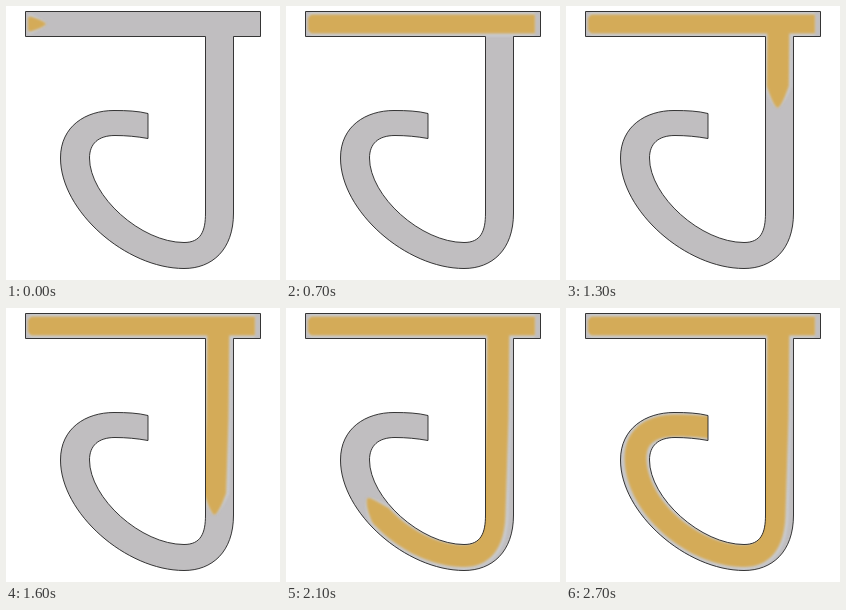
Recreate the animation shown at these times as an HTML page. Size 274 by 274 pixels, loop 2800 ms.

```html
<!DOCTYPE html>
<html>
<head>
<meta charset="utf-8">
<style>
html, body { margin: 0; width: 100%; height: 100%; overflow: hidden; background: #fff; }
svg { display: block; width: 274px; height: 274px; }
</style>
</head>
<body>
<svg viewBox="0 0 274 274">
  <defs>
    <path id="letter" d="M19.5 5.5H254.5V30.5H227.5V207C227.5 244 206 262.5 178 262.5C120 262.5 54.5 205 54.5 152C54.5 120 80 104.500 108 104.500C121 104.500 132 105 142 107.500V132.500C131 130.500 120 129.500 109 129.500C92 129.500 83.500 138 83.500 152C83.500 190 135 236.500 178 236.500C195 236.500 199.500 225 199.500 207V30.5H19.500Z"/>
    <clipPath id="inside"><use href="#letter"/></clipPath>
    <filter id="soft" filterUnits="userSpaceOnUse" x="0" y="0" width="274" height="274" color-interpolation-filters="sRGB">
      <feGaussianBlur stdDeviation="1.3"/>
    </filter>
  </defs>
  <use href="#letter" fill="#c0bec0"/>
  <g clip-path="url(#inside)">
    <g id="halo" fill="#c9cbd0" filter="url(#soft)"></g>
    <g id="paint" fill="#d4ab58" filter="url(#soft)"></g>
  </g>
  <use href="#letter" fill="none" stroke="#222" stroke-width="0.9"/>
</svg>
<script>
const LOOP = 2800, STEP = 100, TIP = 22;

function svgPath(d, parent) {
  const el = document.createElementNS('http://www.w3.org/2000/svg', 'path');
  if (d) el.setAttribute('d', d);
  if (parent) parent.append(el);
  return el;
}

// Each brush stroke: centre line, start time, pixels per step, half width
const strokes = [
  { d: 'M22 18H249', start: 0, speed: 33, half: 9.5 },
  { d: 'M212.5 14L211.5 110L208.5 205C208 235 197 248 178 248C128 248 70 200 69.500 150C69.500 126 88 117.500 110 117.500C122 117.500 132 118 144 119.500L154 121',
    start: 1100, speed: 35, half: 11 }
].map(s => {
  const line = svgPath(s.d);
  const length = line.getTotalLength();
  const points = [];
  for (let i = 0; i <= length; i++) points.push(line.getPointAtLength(i));
  return { ...s, points, halo: svgPath('', halo), paint: svgPath('', paint) };
});

// Ribbon along the centre line, rounded at the start and pointed at the tip
function ribbon({ points, half }, reach, extra) {
  const left = [], right = [];
  const end = Math.min(points.length - 1, Math.floor(reach));
  for (let i = 0; i <= end; i++) {
    const a = points[Math.max(0, i - 1)], b = points[Math.min(points.length - 1, i + 1)];
    const size = Math.hypot(b.x - a.x, b.y - a.y);
    const taper = Math.min(1, ((reach - i) / TIP) ** 0.65, ((i + 2) / 5) ** 0.5);
    const w = (half + extra) * taper / size;
    const nx = (a.y - b.y) * w, ny = (b.x - a.x) * w, p = points[i];
    left.push(`${p.x + nx} ${p.y + ny}`);
    right.unshift(`${p.x - nx} ${p.y - ny}`);
  }
  return left.length ? 'M' + left.concat(right).join('L') + 'Z' : '';
}

function draw(now) {
  const t = Math.floor((now % LOOP) / STEP) * STEP;
  for (const s of strokes) {
    const reach = t < s.start ? -1 : 18 + s.speed * (t - s.start) / STEP;
    s.halo.setAttribute('d', ribbon(s, reach, 3));
    s.paint.setAttribute('d', ribbon(s, reach, 0));
  }
}

const begin = performance.now();
function tick() {
  draw(performance.now() - begin);
  requestAnimationFrame(tick);
}
tick();
</script>
</body>
</html>
```
